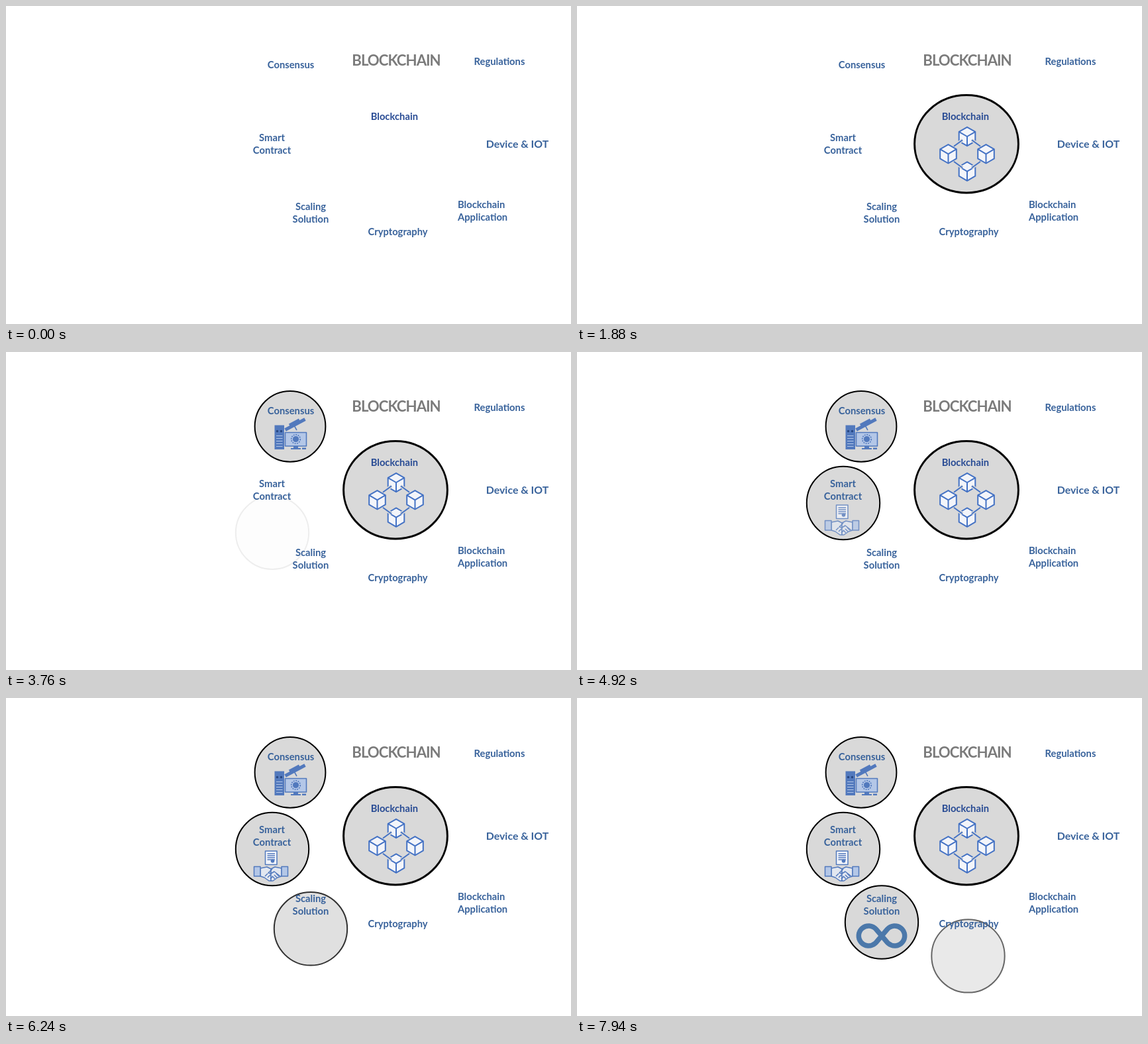
Write an HTML page with a canvas that moves like this. It is 853 px wide and 480 px high and loops after 8 s.

```html
<!DOCTYPE html>
<html lang="en">
<head>
<meta charset="utf-8">
<title>Blockchain topics</title>
<style>
html, body { margin: 0; width: 100%; height: 100%; overflow: hidden; background: #fff; }
canvas { display: block; width: 853px; height: 480px; }
</style>
</head>
<body>
<canvas id="stage" width="853" height="480"></canvas>
<script>
const ctx = document.getElementById('stage').getContext('2d');
const LOOP = 8000, RISE = 890, FADE = 870, LIFT = 48, LEADING = 19;
const BLUE = '#4472c4', SOFT = '#5279bd', PALE = '#b4c7e7', PAPER = '#f1f4fa';
const LABEL = '#38629b', GREY = '#d9d9d9';
const clamp = v => Math.max(0, Math.min(1, v));
const easeOut = v => 1 - (1 - v) ** 3;

const bubbles = [
  { x: 588, y: 208.2, rx: 78.4, ry: 73.7, line: 3, start: 5, icon: drawCubes, iconY: 223 },
  { x: 429, y: 112.3, rx: 53.4, start: 1910, icon: drawMiner, iconY: 124 },
  { x: 402, y: 228, start: 3700, icon: drawContract, iconY: 265 },
  { x: 460, y: 338.5, start: 5533, icon: drawInfinity, iconY: 359 },
  { x: 590.5, y: 369.5, start: 7420 }
].map(b => ({ rx: 55.2, ry: b.rx || 55.2, line: 2, ...b }));

function line(...points) {
  ctx.beginPath();
  points.forEach(p => ctx.lineTo(...p));
  ctx.stroke();
}

function shape(...points) {
  ctx.beginPath();
  points.forEach(p => ctx.lineTo(...p));
  ctx.closePath();
  ctx.fill();
  ctx.stroke();
}

function frame(x, y, w, h) {
  ctx.fillRect(x, y, w, h);
  ctx.strokeRect(x, y, w, h);
}

function disc(x, y, r) {
  ctx.beginPath();
  ctx.arc(x, y, r, 0, Math.PI * 2);
}

function pen(fill, stroke, width) {
  ctx.fillStyle = fill;
  ctx.strokeStyle = stroke;
  ctx.lineWidth = width;
}

// Runs a drawing in its own moved, turned and scaled space.
function place(x, y, paint, { turn = 0, sx = 1, sy = 1 } = {}) {
  ctx.save();
  ctx.translate(x, y);
  ctx.rotate(turn);
  ctx.scale(sx, sy);
  paint();
  ctx.restore();
}

function cube() {
  const corner = i => [14.2 * Math.sin(i * Math.PI / 3), -14.2 * Math.cos(i * Math.PI / 3)];
  shape(...[0, 1, 2, 3, 4, 5].map(corner));
  for (const i of [1, 3, 5]) line([0, 0], corner(i));
}

function drawCubes() {
  pen('#f3f5fa', BLUE, 2);
  for (let i = 0; i < 4; i++) {
    const a = i * Math.PI / 2;
    place(1 + 28.5 * Math.sin(a), 0.3 - 26.3 * Math.cos(a), cube);
  }
  for (const sx of [-1, 1]) for (const sy of [-1, 1]) {
    place(1, 0.3, () => {
      for (const [color, width] of [[GREY, 5], [BLUE, 2]]) {
        pen(GREY, color, width);
        line([7, -21], [20, -11.5]);
      }
    }, { sx, sy });
  }
}

function drawMiner() {
  pen(SOFT, SOFT, 1.6);
  ctx.fillRect(-23.5, -13.5, 14.5, 36.5);
  ctx.fillRect(5, 18, 7, 3);
  ctx.fillRect(1, 21, 15, 2);
  ctx.fillRect(18, 20.5, 6, 2.5);
  place(7.5, -14.5, () => {
    ctx.fillRect(-17, -2.5, 34, 5);
    ctx.fillRect(-8, -5.5, 17, 5);
  }, { turn: -0.49 });
  line([6, -13], [10, -6]);

  ctx.fillStyle = PALE;
  frame(-7.5, -2.5, 32, 20.5);
  for (let y = 2; y < 20; y += 4) ctx.fillRect(-21, y, 9.5, 1);

  ctx.fillStyle = '#26457f';
  for (const x of [-19.5, -13.5]) { disc(x, -4.5, 1.7); ctx.fill(); }
  ctx.fillStyle = SOFT;
  disc(8.5, 7.5, 4.6);
  ctx.fill();
  ctx.setLineDash([2, 1.5]);
  disc(8.5, 7.5, 6.8);
  ctx.stroke();
  ctx.setLineDash([]);
}

function drawContract() {
  pen(PAPER, SOFT, 1.5);
  frame(-10.5, -34, 17.5, 20.5);
  for (let y = -30; y < -20; y += 3) line([-7.5, y], [4, y]);
  ctx.fillStyle = SOFT;
  disc(0.5, -19, 2.8);
  ctx.fill();

  for (const sx of [-1, 1]) place(-2, 0, () => {
    ctx.fillStyle = '#e2e7f0';
    shape([0, -7], [6, -10], [16, -8], [16, 4], [10, 6], [3, 11], [0, 11]);
    ctx.fillStyle = PALE;
    frame(16, -10.5, 9.5, 14.5);
  }, { sx });
  line([0, -7], [-6, -1], [-2, 0], [3, -3], [12, 4]);
  for (let i = 0; i < 3; i++) {
    line([-11 + 4 * i, 4 + 2 * i], [-7 + 4 * i, 2 * i]);
    line([i * 3, 4 - i * 2], [4 + i * 3, 8 - i * 2]);
  }
}

function drawInfinity() {
  const r = 15, d = 19.7, slope = Math.asin(r / d), open = Math.PI / 2 + slope;
  pen(GREY, '#4b78aa', 7.5);
  ctx.beginPath();
  ctx.arc(d, 0, r, -open, open);
  ctx.arc(-d, 0, r, open - Math.PI, Math.PI - open, true);
  ctx.closePath();
  ctx.stroke();
}

function oval(b, y = b.y, inset = 0) {
  ctx.beginPath();
  ctx.ellipse(b.x, y, b.rx - inset, b.ry - inset, 0, 0, Math.PI * 2);
  ctx.fill();
}

function drawBubble(b, t) {
  const p = clamp((t - b.start) / RISE);
  if (p === 0) return;
  ctx.globalAlpha = p;
  pen(GREY, '#000', b.line);
  oval(b, b.y + LIFT * (1 - p));
  ctx.stroke();

  // A fading grey veil uncovers the icon evenly.
  const shown = easeOut(clamp((t - b.start - RISE) / FADE));
  if (b.icon && shown > 0) {
    place(b.x, b.iconY, b.icon);
    ctx.globalAlpha = 1 - shown;
    ctx.fillStyle = GREY;
    oval(b, b.y, b.line / 2);
  }
  ctx.globalAlpha = 1;
}

function text(str, x, y, { size = 14.75, color = LABEL, align = 'center', spacing = 0 } = {}) {
  ctx.font = `700 ${size}px Lato, sans-serif`;
  ctx.letterSpacing = `${spacing}px`;
  ctx.textAlign = align;
  ctx.fillStyle = color;
  str.split('\n').forEach((row, i) => ctx.fillText(row, x, y + i * LEADING));
}

function drawLabels() {
  text('BLOCKCHAIN', 589, 89.5, { size: 22.2, color: '#7b7b7b', spacing: -1 });
  text('Blockchain', 586.3, 172, { color: '#284b94' });
  text('Consensus', 430, 94);
  text('Regulations', 745, 89);
  text('Smart\nContract', 401.5, 204);
  text('Scaling\nSolution', 460, 308);
  text('Cryptography', 591.5, 346);
  text('Blockchain\nApplication', 682, 305, { align: 'left' });
  text('Device & IOT', 772, 214, { size: 15.9 });
}

function draw(t) {
  ctx.fillStyle = '#fff';
  ctx.fillRect(0, 0, 853, 480);
  ctx.lineJoin = 'round';
  bubbles.forEach(b => drawBubble(b, t));
  drawLabels();
}

const begin = performance.now();
function tick() {
  draw((performance.now() - begin) % LOOP);
  requestAnimationFrame(tick);
}
tick();
</script>
</body>
</html>
```
